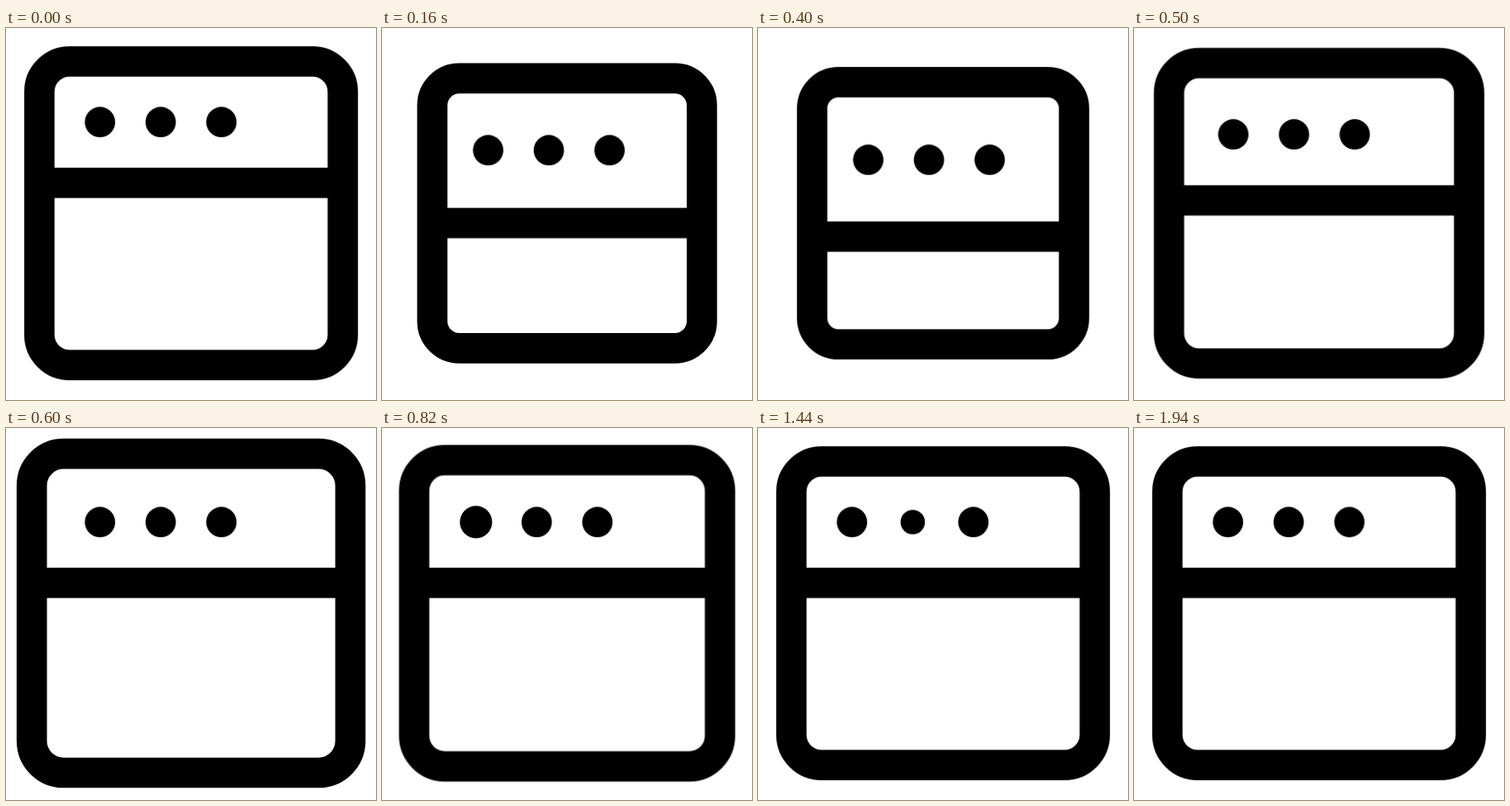
An HTML page without scripts for the animation above (1.96 s loop, 448 by 450 pixels).

```html
<!DOCTYPE html>
<html lang="en">
<head>
<meta charset="utf-8">
<title>Window icon</title>
<style>
  html, body { margin: 0; width: 100%; height: 100%; overflow: hidden; background: #fff; }
  svg { display: block; width: 448px; height: 450px; }

  .box, .bar, .dots, .dot {
    animation: 1.96s cubic-bezier(.37, 0, .63, 1) infinite;
  }
  .box {
    fill: none; stroke: #000; stroke-width: 36.7px;
    vector-effect: non-scaling-stroke;
    animation-name: box;
  }
  .bar { animation-name: bar; }
  .dots { animation-name: dots; }
  .dot {
    transform-box: fill-box; transform-origin: center;
    animation-name: pulse;
    animation-delay: calc(.72s + var(--i) * .36s);
  }

  /* squeeze 0-300 ms, overshoot at 600 ms, settle at 900 ms */
  @keyframes box {
    0% { transform: scale(1); }
    15.306% { transform: scale(.8); }
    30.612% { transform: scale(1.05); }
    45.918%, 100% { transform: scale(1); }
  }
  @keyframes bar {
    0% { transform: translateY(0) scaleX(1); }
    15.306% { transform: translateY(87px) scaleX(.8); }
    30.612% { transform: translateY(0) scaleX(1.05); }
    45.918%, 100% { transform: translateY(0) scaleX(1); }
  }
  @keyframes dots {
    0% { transform: translate(0, 0); }
    15.306% { transform: translate(26.3px, 61px); }
    30.612%, 100% { transform: translate(0, 0); }
  }
  /* each dot swells, shrinks and recovers within 520 ms */
  @keyframes pulse {
    0% { transform: scale(1); }
    8.844% { transform: scale(1.1); }
    17.687% { transform: scale(.8); }
    26.531%, 100% { transform: scale(1); }
  }
</style>
</head>
<body>
<svg viewBox="0 0 448 450">
  <g transform="translate(224.1 224.1)">
    <rect class="box" x="-183.7" y="-183.7" width="367.4" height="367.4" rx="36.7"/>
    <rect class="bar" x="-183.7" y="-55.1" width="367.4" height="36.7"/>
    <g class="dots">
      <circle class="dot" style="--i:0" cx="-110.3" cy="-110.3" r="18.4"/>
      <circle class="dot" style="--i:1" cx="-36.8" cy="-110.3" r="18.4"/>
      <circle class="dot" style="--i:2" cx="36.7" cy="-110.3" r="18.4"/>
    </g>
  </g>
</svg>
</body>
</html>
```
